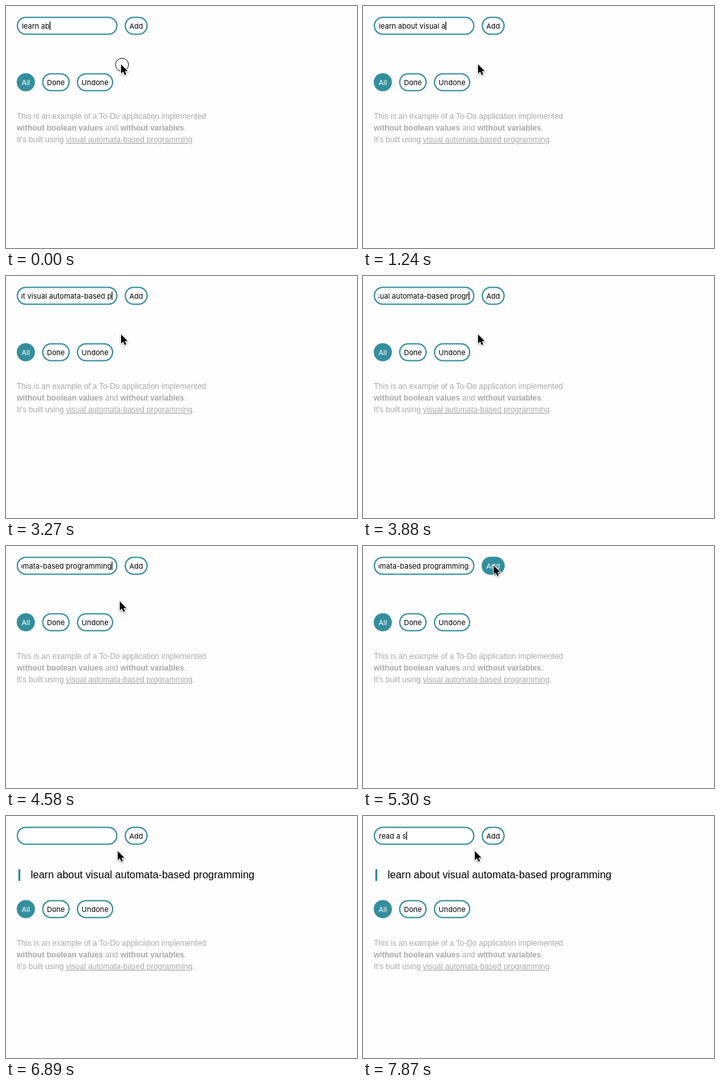
These frames come from a looping animation (540x373 px, 8000 ms). An HTML page:

```html
<!DOCTYPE html>
<html lang="en">
<head>
<meta charset="utf-8">
<title>To-Do</title>
<style>
  html, body { margin: 0; height: 100%; overflow: hidden; background: #fefefe; }
  svg { display: block; }
  .ui { font: 11px Inter, sans-serif; letter-spacing: .06px; white-space: pre; }
  .box rect { fill: #fff; stroke: #338f9d; stroke-width: 2; }
  .box text { text-anchor: middle; }
  .box.on rect { fill: #338f9d; }
  .box.on text { fill: #fff; }
  .about { font: 12px "Liberation Sans", Arial, sans-serif; fill: #a9a9a9; }
  .task { font: 16px "Liberation Sans", Arial, sans-serif; }
  #arrow { stroke: #fff; stroke-width: 2; paint-order: stroke; filter: drop-shadow(0 1px 1px #0006); }
  #beam { fill: none; stroke: #000; filter: drop-shadow(0 0 1px #fff); }
</style>
</head>
<body>
<svg id="stage" width="540" height="373" viewBox="0 0 540 373">
  <g id="form" class="ui"></g>
  <svg class="ui" x="24" y="20" width="140" height="22">
    <text id="typed" y="15"></text>
    <rect id="caret" y="4" width="1.2" height="13"/>
  </svg>
  <g id="task" class="task">
    <rect x="19" y="82" width="3" height="18" fill="#338f9d"/>
    <text x="38" y="96">learn about visual automata-based programming</text>
  </g>
  <g id="lower">
    <g id="filters" class="ui"></g>
    <g class="about">
      <text x="16.5" y="174">This is an example of a To-Do application implemented</text>
      <text x="16.5" y="192"><tspan font-weight="bold">without boolean values</tspan> and <tspan font-weight="bold">without variables</tspan>.</text>
      <text x="16.5" y="210">It's built using <tspan text-decoration="underline">visual automata-based programming</tspan>.</text>
    </g>
  </g>
  <g id="cursor">
    <circle id="ring" cx="1.5" cy=".5" r="10" fill="none" stroke="#000"/>
    <path id="arrow" d="M0 0V14L3.2 11L5.6 16.2L8 15.2L5.8 10.3H10.2Z"/>
    <path id="beam" d="M-3 -7Q0 -7 .5 -5.5Q1 -7 4 -7M.5 -5.5V5.5M-3 7Q0 7 .5 5.5Q1 7 4 7M-1.5 3H2.5"/>
  </g>
</svg>
<script>
const LOOP = 8000, ADDED = 5480;
const FIRST = "learn about visual automata-based programming", SECOND = "read a s";

// [time, characters typed]
const firstKeys = [[0, 8], [90, 9], [1070, 18], [1160, 19], [1240, 20], [2030, 26], [2210, 27],
  [2470, 29], [3180, 34], [3270, 35], [4230, 42], [4410, 43], [4580, 45]];
const secondKeys = [[6990, 0], [7080, 1], [7350, 4], [7520, 5], [7700, 6], [7870, 8]];
secondKeys.splice(5, 0, [7790, 7]);
// [time, x, y]
const cursorKeys = [[0, 177, 90], [4410, 177, 90], [4580, 175, 85.5], [5300, 201, 30],
  [5830, 201, 30], [6100, 135, 39], [6550, 135, 39], [6910, 172, 54]];

const $ = id => document.getElementById(id);
const show = (id, on) => $(id).setAttribute("visibility", on ? "visible" : "hidden");
const within = (t, from, to) => t >= from && t < to;

function addBox(parent, left, right, cy, label, on) {
  const text = label ? `<text x="${(left + right) / 2}" y="${cy + 4.5}">${label}</text>` : "";
  $(parent).insertAdjacentHTML("beforeend",
    `<g class="box${on ? " on" : ""}"><rect x="${left + 1}" y="${cy - 13}" width="${right - left - 2}" height="26" rx="13"/>${text}</g>`);
  return $(parent).lastElementChild;
}

function sample(keys, t, ease = u => u) {
  const i = keys.findIndex(k => k[0] > t);
  if (i === 0) return keys[0].slice(1);
  if (i < 0) return keys[keys.length - 1].slice(1);
  const a = keys[i - 1], b = keys[i], u = ease((t - a[0]) / (b[0] - a[0]));
  return a.slice(1).map((v, j) => v + (b[j + 1] - v) * u);
}

addBox("form", 16.5, 171.5, 30.5);
const addButton = addBox("form", 182.5, 218, 30.5, "Add");
addBox("filters", 16.5, 44.5, 117.5, "All", true);
addBox("filters", 55.5, 98, 117.5, "Done");
addBox("filters", 109, 165, 117.5, "Undone");

function draw(t) {
  const added = t >= ADDED;
  const [count] = sample(added ? secondKeys : firstKeys, t);
  const typed = $("typed");
  typed.textContent = (added ? SECOND : FIRST).slice(0, Math.floor(count + 1e-6));
  const width = typed.getComputedTextLength();
  const left = Math.min(.4, 138.5 - width);
  typed.setAttribute("x", left);
  $("caret").setAttribute("x", left + width);
  show("caret", t < 5080 || within(t, 6280, 6780) || t >= 7080);

  show("task", added);
  $("lower").setAttribute("transform", `translate(0 ${added ? 26 : 0})`);

  const [x, y] = sample(cursorKeys, t, u => u * (2 - u));
  const overInput = within(x, 17, 171) && within(y, 17, 44);
  $("cursor").setAttribute("transform", `translate(${x} ${y})`);
  show("arrow", !overInput);
  show("beam", overInput);
  show("ring", t < 90 || within(t, ADDED, 5830) || within(t, 6280, 6550));
  addButton.classList.toggle("on", within(x, 183, 218) && within(y, 17, 44));
}

function tick() {
  draw(performance.now() % LOOP);
  requestAnimationFrame(tick);
}
tick();
</script>
</body>
</html>
```
